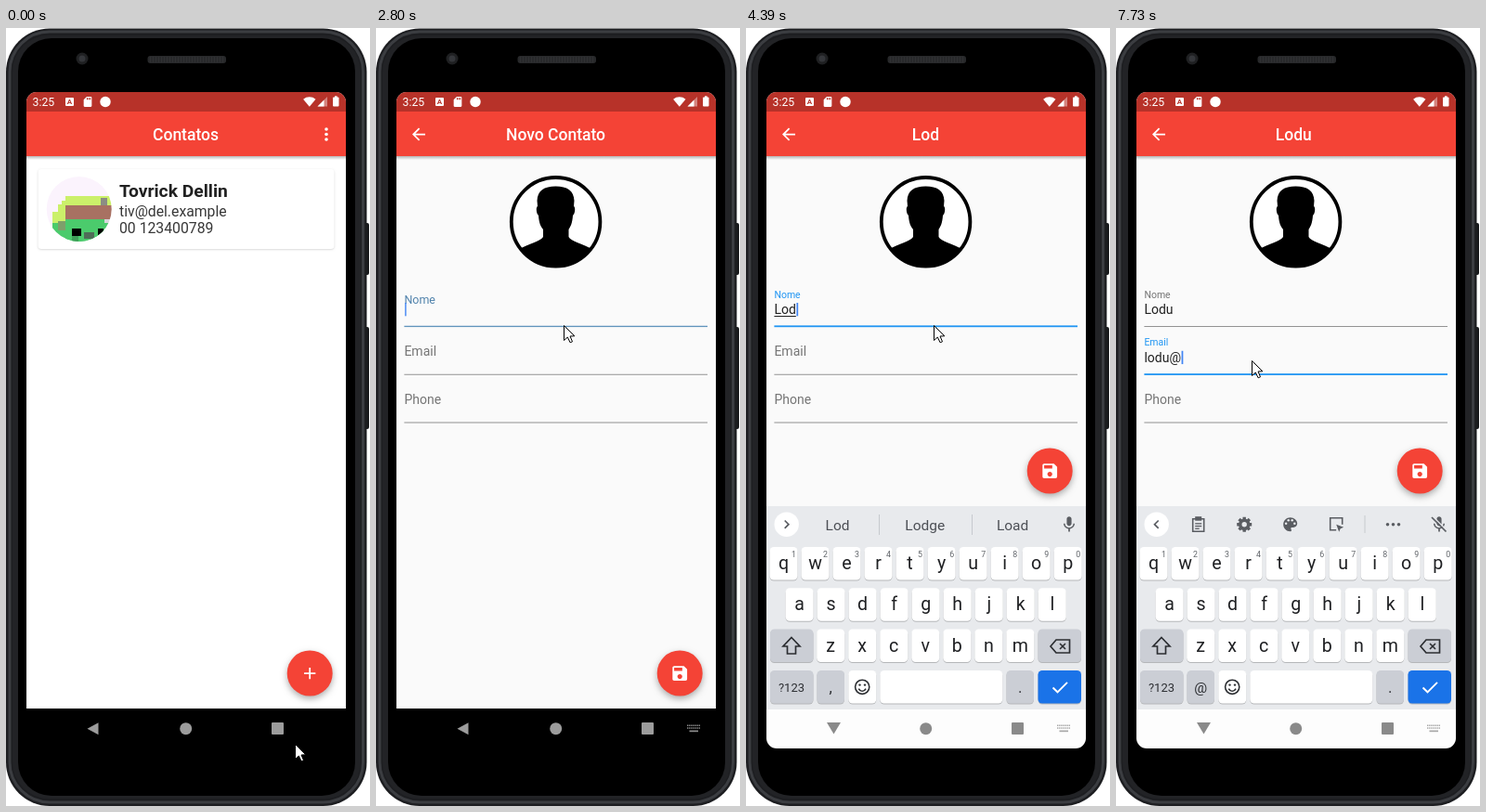
These frames come from a looping animation (392 px wide and 838 px high, 8000 ms). An HTML page with a canvas:

```html
<!DOCTYPE html>
<html lang="pt">
<head>
<meta charset="utf-8">
<title>Contatos</title>
<style>
html, body { margin: 0; width: 100%; height: 100%; overflow: hidden; background: #fff; }
canvas { display: block; width: 392px; height: 838px; }
</style>
</head>
<body>
<canvas id="stage"></canvas>
<script>
const W = 392, H = 838, LOOP = 8000;
const RED = '#f44336', BLUE = [33, 150, 243], GREY = [117, 117, 117], LINE = [146, 146, 146];
const dpr = window.devicePixelRatio || 1;

function setup(canvas) {
  canvas.width = W * dpr;
  canvas.height = H * dpr;
  const c = canvas.getContext('2d');
  c.scale(dpr, dpr);
  return c;
}
const main = setup(document.getElementById('stage'));
const layer = setup(document.createElement('canvas'));
let g = main;

const ICON = {
  back: new Path2D('M20 11H7.83l5.59-5.59L12 4l-8 8 8 8 1.41-1.41L7.83 13H20v-2z'),
  add: new Path2D('M19 13h-6v6h-2v-6H5v-2h6V5h2v6h6v2z'),
  save: new Path2D('M17 3H5c-1.11 0-2 .9-2 2v14c0 1.1.89 2 2 2h14c1.1 0 2-.9 2-2V7l-4-4zm-5 16c-1.66 0-3-1.34-3-3s1.34-3 3-3 3 1.34 3 3-1.34 3-3 3zm3-10H5V5h10v4z'),
  card: new Path2D('M18 2h-8L4 8v12c0 1.1.9 2 2 2h12c1.1 0 2-.9 2-2V4c0-1.1-.9-2-2-2zm-6 6h-2V4h2v4zm3 0h-2V4h2v4zm3 0h-2V4h2v4z'),
  mic: new Path2D('M12 14c1.66 0 3-1.34 3-3V5c0-1.66-1.34-3-3-3S9 3.34 9 5v6c0 1.66 1.34 3 3 3zm5.3-3c0 3-2.54 5.1-5.3 5.1S6.7 14 6.7 11H5c0 3.41 2.72 6.23 6 6.72V21h2v-3.28c3.28-.48 6-3.3 6-6.72h-1.7z'),
  palette: new Path2D('M12 3c-4.97 0-9 4.03-9 9s4.03 9 9 9c.83 0 1.5-.67 1.5-1.5 0-.39-.15-.74-.39-1.01-.23-.26-.38-.61-.38-.99 0-.83.67-1.5 1.5-1.5H16c2.76 0 5-2.24 5-5 0-4.42-4.03-8-9-8z'),
  person: new Path2D('M193.500 170.500C206 170.500 213 175 213.500 186L213 192C215 193 214.500 200 212 202C211.500 210 209.500 214 207.500 217L207.500 225C210 230 222 232 234 239L250 262L137 262L153 239C165 232 177 230 180 225L180 217C177.500 214 175.500 210 175 202C172.500 200 172 193 174 192L173.500 186C174 175 181 170.500 193.500 170.500Z')
};

// ---- helpers ----
const clamp = v => Math.max(0, Math.min(1, v));
const smooth = s => s * s * (3 - 2 * s);
const ramp = (t, from, len) => smooth(clamp((t - from) / len));
const mix = (a, b, k) => `rgb(${a.map((v, i) => Math.round(v + (b[i] - v) * k))})`;
const within = (t, spans) => spans.some(([a, b]) => t >= a && t < b);
const latest = (t, steps) => steps.filter(s => t >= s[0]).pop()[1];

function rect(x, y, w, h, color) {
  g.fillStyle = color;
  g.fillRect(x, y, w, h);
}
function rr(x, y, w, h, r, color) {
  g.beginPath();
  g.roundRect(x, y, w, h, r);
  g.fillStyle = color;
  g.fill();
}
function dot(x, y, r, color) {
  g.beginPath();
  g.arc(x, y, r, 0, 7);
  g.fillStyle = color;
  g.fill();
}
function ring(x, y, r, width, color, a = 0, b = 2 * Math.PI) {
  g.beginPath();
  g.arc(x, y, r, a, b);
  g.lineWidth = width;
  g.strokeStyle = color;
  g.stroke();
}
function trace(pts, close) {
  g.beginPath();
  for (let i = 0; i < pts.length; i += 2) g.lineTo(pts[i], pts[i + 1]);
  if (close) g.closePath();
}
function poly(pts, color) {
  trace(pts, true);
  g.fillStyle = color;
  g.fill();
}
function stroke(pts, width, color, close) {
  trace(pts, close);
  g.lineWidth = width;
  g.strokeStyle = color;
  g.stroke();
}
function txt(s, x, y, size, color, weight = 400, align = 'left') {
  g.font = `${weight} ${size}px Roboto, sans-serif`;
  g.textAlign = align;
  g.fillStyle = color;
  g.fillText(s, x, y);
}
function icon(path, x, y, size, color) {
  g.save();
  g.translate(x - size / 2, y - size / 2);
  g.scale(size / 24, size / 24);
  g.fillStyle = color;
  g.fill(path);
  g.restore();
}
function shadow(blur, dy, alpha) {
  g.shadowColor = `rgba(0,0,0,${alpha})`;
  g.shadowBlur = blur * dpr;
  g.shadowOffsetY = dy * dpr;
}

// ---- phone ----
function phone() {
  rect(0, 0, W, H, '#fff');
  rr(385, 210, 6, 56, 2, '#17181a');
  rr(385, 322, 6, 110, 2, '#17181a');
  rr(0, .5, 388.5, 837.5, 47, '#1d1e21');
  g.beginPath();
  g.roundRect(4, 4, 380.5, 830, 43);
  g.lineWidth = 3;
  g.strokeStyle = '#3b3d41';
  g.stroke();
  rr(7, 8, 375, 822, 39, '#222326');
  rr(13, 11, 363, 816, 36, '#000');
  dot(82, 33, 6.5, '#1f2022');
  dot(82, 33, 3.5, '#34363a');
  rr(152.500, 30, 84.5, 8, 3, '#28292b');
  for (let x = 155; x < 235; x += 3) rect(x, 31, 1, 6, '#303133');
}

function status() {
  rect(22, 69, 344, 21, 'rgba(0,0,0,.25)');
  const c = '#fff';
  txt('3:25', 28.5, 84, 12.3, c);
  rr(64, 75, 9, 9, 1, c);
  txt('A', 68.5, 82.4, 8, '#b73228', 700, 'center');
  icon(ICON.card, 88, 79.5, 13, c);
  dot(107, 79.5, 5.7, c);
  g.beginPath();
  g.moveTo(326.8, 84.8);
  g.arc(326.8, 84.8, 10.5, -Math.PI / 2 - .69, -Math.PI / 2 + .69);
  g.fillStyle = c;
  g.fill();
  poly([335.5, 84.5, 346, 84.5, 346, 74], 'rgba(255,255,255,.4)');
  poly([335.5, 84.5, 342.5, 84.5, 342.5, 77.5], c);
  rr(352, 74.5, 6.5, 10, 1, c);
  rect(354, 73.3, 2.6, 2, c);
}

function appBar(title) {
  const grad = g.createLinearGradient(0, 138, 0, 142);
  grad.addColorStop(0, 'rgba(0,0,0,.28)');
  grad.addColorStop(1, 'rgba(0,0,0,0)');
  rect(22, 138, 344, 4, grad);
  rect(22, 69, 344, 69, RED);
  txt(title, 193.5, 121, 17.5, '#fff', 500, 'center');
}

// ---- pages ----
function photo() {
  const lime = '#cbf06a', green = '#4bcb6c', brown = '#a87162';
  g.save();
  g.beginPath();
  g.arc(78.7, 195, 35, 0, 7);
  g.clip();
  rect(43, 160, 72, 72, '#fbf3fd');
  [[64, 181, 50, 11, lime], [56, 190, 10, 10, lime], [50, 198, 16, 13, lime], [60, 186, 8, 6, lime],
   [102, 183, 7, 8, '#8b8d84'], [64, 191, 50, 15, brown], [106, 206, 8, 6, '#d9d6dc'],
   [64, 206, 42, 25, green], [50, 210, 64, 21, green], [56, 208, 8, 10, '#7f9f6b'],
   [71, 216, 10, 8, '#000'], [84, 220, 11, 7, '#4f6d58'], [99, 216, 6, 7, '#000'], [71, 224, 7, 6, '#3f9f5a']]
    .forEach(b => rect(...b));
  g.restore();
}

function listPage() {
  rect(22, 69, 344, 665, '#fff');
  appBar('Contatos');
  [109, 114.5, 120].forEach(y => dot(345, y, 1.8, '#fff'));
  g.save();
  shadow(2, .8, .17);
  rr(34.5, 152, 319, 86, 3.5, '#fff');
  g.restore();
  photo();
  txt('Tovrick Dellin', 122, 182.3, 19.27, '#212121', 700);
  txt('tiv@del.example', 122, 202.7, 15.77, '#383838');
  txt('00 123400789', 122, 221.2, 15.77, '#383838');
}

function field(row, label, value, lift, focus, caret, composing) {
  const y = 321 + 51.75 * row;
  txt(label, 30.4, y - 20 - 10.4 * lift, 14 - 3.5 * lift, mix(GREY, BLUE, focus));
  rect(30.4, y - focus * .6, 326.6, 1 + focus * .8, mix(LINE, BLUE, focus));
  txt(value, 30.4, y - 12.8, 14, '#212121');
  const w = g.measureText(value).width;
  if (composing) rect(30.4, y - 11, g.measureText(value.trim()).width, 1, '#212121');
  if (caret) {
    g.globalAlpha = caret;
    rect(31 + w, y - 25, 1.75, 14.3, '#4285f4');
    g.globalAlpha = 1;
  }
}

const nameSteps = [[0, ''], [3700, 'L'], [3950, 'Lo'], [4200, 'Lod'], [4400, 'Lodu'], [4820, 'Lodu ']];
const mailSteps = [[0, ''], [6720, 'l'], [6890, 'lo'], [7060, 'lod'], [7420, 'lodu'], [7550, 'lodu@']];

function formPage(t) {
  const name = latest(t, nameSteps), mail = latest(t, mailSteps);
  const toName = ramp(t, 2710, 200), toMail = ramp(t, 5790, 200);
  rect(22, 69, 344, 665, '#fafafa');
  appBar(name || 'Novo Contato');
  icon(ICON.back, 46, 114.5, 21, '#fff');

  dot(193.6, 208.8, 48, '#fff');
  g.save();
  g.beginPath();
  g.arc(193.6, 208.8, 48, 0, 7);
  g.clip();
  g.fillStyle = '#000';
  g.fill(ICON.person);
  g.restore();
  ring(193.6, 208.8, 47.8, 3.8, '#000');

  const nameCaret = within(t, [[2670, 3450], [3700, 5460]]) ? clamp((t - 2600) / 250) : 0;
  const mailCaret = within(t, [[5860, 6410], [6720, LOOP]]) ? 1 : 0;
  field(0, 'Nome', name, toName, toName * (1 - toMail), nameCaret, within(t, [[3700, 5000]]));
  field(1, 'Email', mail, toMail, toMail, mailCaret, within(t, [[6720, 7730]]));
  field(2, 'Phone', '', 0, 0, 0, false);
}

function fab(t) {
  const y = t >= 2990 ? 477 : 695;
  g.save();
  shadow(7, 3, .32);
  dot(327.2, y, 24.5, RED);
  g.restore();
  icon(t >= 1350 ? ICON.save : ICON.add, 327.2, y, 21, '#fff');
}

// ---- keyboard ----
const INK = '#5a5d62';
const toolbar = {
  sticker(x, y) {
    stroke([x - 7, y - 7, x + 7, y - 7, x + 7, y + 2, x + 2, y + 7, x - 7, y + 7], 1.6, INK, true);
    stroke([x + 7, y + 2, x + 2, y + 2, x + 2, y + 7], 1.4, INK);
    dot(x - 3, y - 2.5, 1.1, INK);
    dot(x + 3, y - 2.5, 1.1, INK);
    ring(x, y, 3.6, 1.3, INK, .9, 2.7);
  },
  gif(x, y) { txt('GIF', x, y + 4.5, 12.5, INK, 900, 'center'); },
  clip(x, y) {
    stroke([x - 6, y - 6, x + 6, y - 6, x + 6, y + 7.5, x - 6, y + 7.5], 1.6, INK, true);
    rect(x - 3.5, y - 8.5, 7, 4.5, INK);
    [-1, 1.7, 4.4].forEach((d, i) => rect(x - 3.5, y + d - .5, i < 2 ? 7 : 4.5, 1.3, INK));
  },
  gear(x, y) {
    ring(x, y, 4.5, 3.6, INK);
    for (let a = 0; a < 8; a++) {
      const c = Math.cos(a * Math.PI / 4), s = Math.sin(a * Math.PI / 4);
      stroke([x + 5 * c, y + 5 * s, x + 8 * c, y + 8 * s], 3.4, INK);
    }
  },
  palette(x, y) {
    icon(ICON.palette, x, y, 20, INK);
    [[-4.6, -1], [-2, -4.5], [2, -4.5], [4.6, -1]].forEach(([a, b]) => dot(x + a, y + b, 1.25, '#e8eaed'));
  },
  note(x, y) {
    stroke([x + 6.5, y, x + 6.5, y - 7, x - 6.5, y - 7, x - 6.5, y + 6, x, y + 6], 1.6, INK);
    poly([x, y, x + 8, y + 3, x + 4.5, y + 4.5, x + 3, y + 8], INK);
  }
};

function words(t) {
  if (within(t, [[3880, 5720]])) {
    return latest(t, [[0, ['L', 'I', 'Love']], [3950, ['Lo', 'Look', 'Long']], [4200, ['Lod', 'Lodge', 'Load']],
      [4640, ['Lodu', 'Lodge', 'Load']], [5000, ['to', 'I', 'you']]]);
  }
  if (within(t, [[6780, 7730]])) {
    return latest(t, [[0, ['l', 'lo', 'la']], [6890, ['lo', 'look', 'long']], [7060, ['lod', 'lodge', 'load']],
      [7420, ['lodu', 'lodge', 'load']]]);
  }
  return null;
}

function topStrip(t, mailMode) {
  const list = words(t), y = 534.7;
  dot(43.7, y, 13.2, '#fff');
  const d = list ? 1 : -1;
  stroke([43.7 - 2 * d, y - 4.2, 43.7 + 2.2 * d, y, 43.7 - 2 * d, y + 4.2], 1.7, INK);
  if (list) {
    list.forEach((w, i) => txt(w, 98.5 + 94.3 * i, 541, 15.5, '#4c4f55', 400, 'center'));
    rect(143, 524, 1, 22, '#c6c9ce');
    rect(243, 524, 1, 22, '#c6c9ce');
  } else {
    const set = mailMode ? ['clip', 'gear', 'palette', 'note'] : ['sticker', 'gif', 'clip', 'gear'];
    set.forEach((k, i) => toolbar[k](88.7 + 49.5 * i, y));
    rect(267.5, 525, 1, 19, '#c6c9ce');
    [292.5, 298.5, 304.5].forEach(x => dot(x, y, 1.8, INK));
  }
  icon(ICON.mic, 348, y, 20.5, INK);
  if (mailMode) {
    stroke([341, 526, 357, 542], 1.6, '#e8eaed');
    stroke([340, 527, 355.5, 542.5], 1.7, INK);
  }
}

function key(x, y, w, color) {
  rr(x, y + 1, w, 35.5, 4.5, 'rgba(0,0,0,.22)');
  rr(x, y, w, 35.5, 4.5, color);
}

function keyRow(letters, x0, y, digits) {
  [...letters].forEach((c, i) => {
    const x = x0 + 34.02 * i;
    key(x - 15, y, 30, '#fff');
    txt(c, x, y + 24, 19.6, '#1f2023', 400, 'center');
    if (digits) txt((i + 1) % 10, x + 11, y + 10.5, 8.8, '#5f6368', 400, 'center');
  });
}

function keyboard(t) {
  const off = 262 * (1 - ramp(t, 2920, 260));
  if (off >= 262) return;
  const mailMode = t >= 6030, soft = '#cbced5', ink = '#2c2e32';
  g.save();
  g.translate(0, off);
  rect(22, 515, 344, 219, '#e8eaed');
  rect(22, 734, 344, 42, '#fdfdfd');
  topStrip(t, mailMode);
  keyRow('qwertyuiop', 40.5, 559, true);
  keyRow('asdfghjkl', 57.6, 603.3);
  keyRow('zxcvbnm', 91.2, 647.5);

  key(26, 647.5, 46.5, soft);
  stroke([49, 656.5, 58, 666, 53.5, 666, 53.5, 674, 44.5, 674, 44.5, 666, 40, 666], 1.7, ink, true);
  key(314.5, 647.5, 46.5, soft);
  stroke([328, 666, 334, 659, 348.5, 659, 348.5, 673, 334, 673], 1.7, ink, true);
  stroke([338, 663, 344, 669], 1.6, ink);
  stroke([344, 663, 338, 669], 1.6, ink);

  key(26, 692, 46.5, soft);
  txt('?123', 49, 714.8, 13, ink, 400, 'center');
  key(76.5, 692, 29.5, soft);
  txt(mailMode ? '@' : ',', 91.2, 716, mailMode ? 15.5 : 17, ink, 400, 'center');
  key(110.3, 692, 30, '#fff');
  ring(125.2, 709.8, 7.6, 1.6, ink);
  dot(122.5, 707.6, 1.2, ink);
  dot(128, 707.6, 1.2, ink);
  ring(125.2, 710, 4.2, 1.5, ink, .4, 2.74);
  key(144.3, 692, 132, '#fff');
  key(280.5, 692, 29.5, soft);
  txt('.', 295.3, 716, 17, ink, 400, 'center');
  key(314.5, 692, 46.5, '#1a73e8');
  stroke([330.5, 710.5, 335.5, 715.3, 346, 704.8], 1.9, '#fff');
  g.restore();
}

function navBar(t) {
  const up = t >= 3060, c = up ? '#8a8a8a' : '#9c9c9c';
  poly(up ? [87, 748, 102, 748, 94.5, 760.5] : [87.5, 754.7, 99.5, 748.2, 99.5, 761.2], c);
  dot(193.7, 754.7, 6.5, c);
  rr(286, 748, 13, 13, 1, c);
  if (t < 2660) return;
  const k = up ? '#a8a8a8' : '#8c8c8c';
  for (let i = 0; i < 7; i++) {
    rect(335 + 2.1 * i, 750.5, 1.4, 1.5, k);
    rect(335 + 2.1 * i, 753.3, 1.4, 1.5, k);
  }
  rect(337.5, 756.5, 9.5, 1.7, k);
}

// ---- pointer ----
const path = [[0, 311, 771], [60, 311, 771], [300, 325, 712], [410, 331, 683], [530, 331, 702], [1700, 331, 702],
  [1920, 312, 590], [2320, 214, 190], [2560, 202, 320], [5190, 202, 320], [5390, 154, 350], [5580, 146, 358],
  [LOOP, 146, 358]];
const clicks = [[1180, 1320, 331, 702], [2570, 2690, 202, 320], [5700, 5830, 146, 358]];

function pointer(t) {
  clicks.forEach(([a, b, x, y]) => {
    if (t >= a && t < b) dot(x, y, 12, 'rgba(255,230,0,.52)');
  });
  const i = path.findIndex(p => p[0] > t);
  const [ta, xa, ya] = path[i - 1], [tb, xb, yb] = path[i];
  const k = (t - ta) / (tb - ta);
  g.save();
  g.translate(Math.round(xa + (xb - xa) * k) + .5, Math.round(ya + (yb - ya) * k) + .5);
  const arrow = [0, 0, 0, 16, 3.8, 12.5, 6.6, 18.3, 9, 17.3, 6.5, 11.5, 11.3, 11.3];
  poly(arrow, '#fff');
  stroke(arrow, 1, '#000', true);
  g.restore();
}

// ---- frame ----
function pages(t) {
  const start = 1350, len = 290;
  if (t < start + len) listPage();
  if (t < start) return;
  if (t >= start + len) return formPage(t);
  const s = (t - start) / len;
  g = layer;
  g.clearRect(0, 0, W, H);
  formPage(t);
  g = main;
  g.globalAlpha = s * s;
  g.drawImage(layer.canvas, 0, 172 * (1 - smooth(s)), W, H);
  g.globalAlpha = 1;
}

function draw(t) {
  phone();
  g.save();
  g.beginPath();
  g.roundRect(22, 69, 344, 707, 11);
  g.clip();
  g.save();
  g.beginPath();
  g.rect(22, 69, 344, 664);
  g.clip();
  pages(t);
  fab(t);
  status();
  g.restore();
  keyboard(t);
  navBar(t);
  g.restore();
  pointer(t);
}

const begin = performance.now();
function tick() {
  draw((performance.now() - begin) % LOOP);
  requestAnimationFrame(tick);
}
tick();
</script>
</body>
</html>
```
